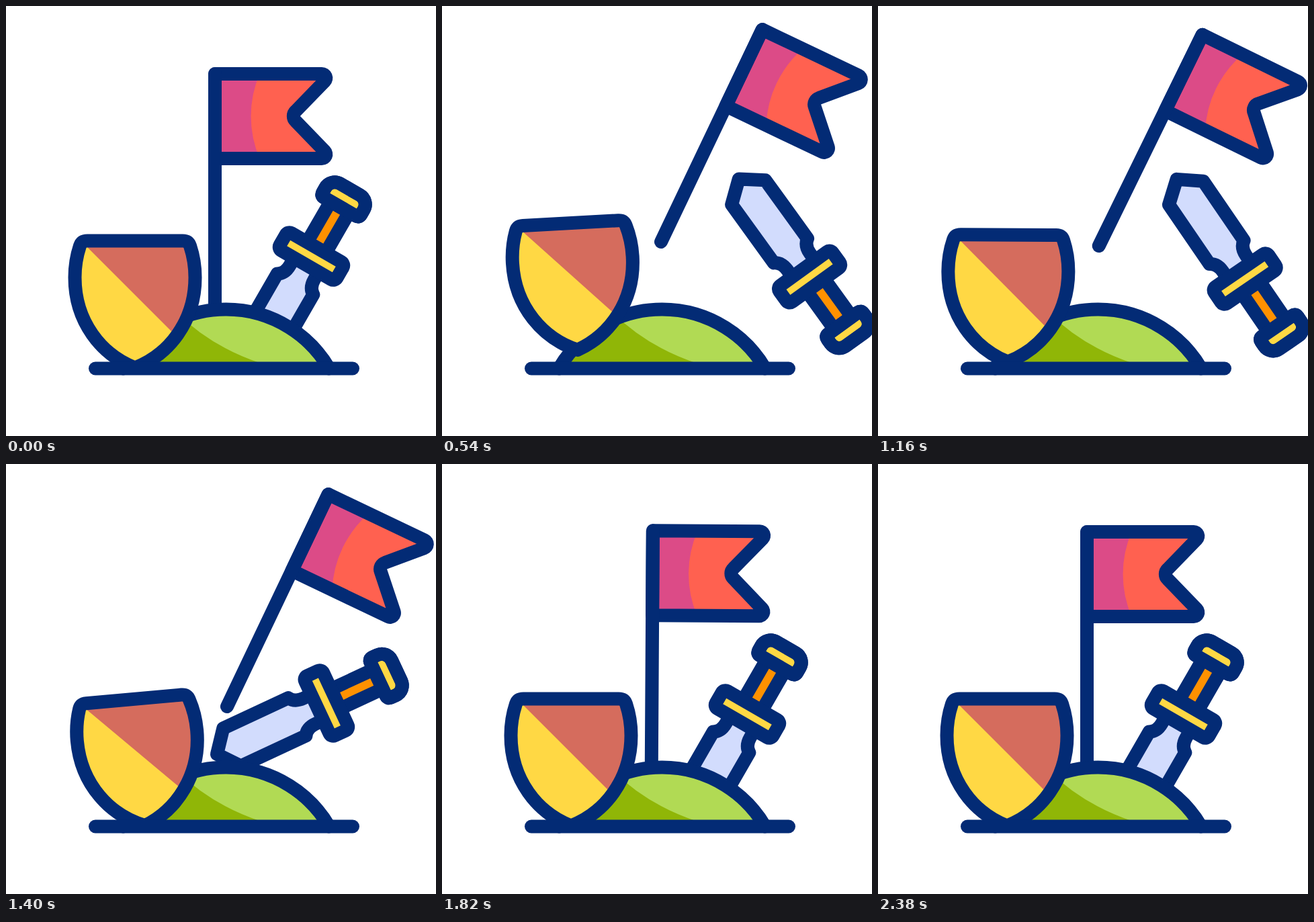
Recreate the animation shown at these times as an HTML page. Size 640x640 px, loop 2400 ms.

```html
<!DOCTYPE html>
<html lang="en">
<head>
<meta charset="utf-8">
<title>Flag, shield and sword</title>
<style>
  html, body { margin: 0; width: 100%; height: 100%; overflow: hidden; background: #fff; }
  svg { display: block; width: 100vw; height: 100vh; }
  .line { fill: none; stroke: #032b75; stroke-width: 20; stroke-linecap: round; stroke-linejoin: round; }
</style>
</head>
<body>
<svg viewBox="0 0 640 640">
  <defs>
    <path id="cloth" d="M311 101H470a6.3 6.3 0 0 1 4.5 10.7L431 156.6a10 10 0 0 0 0 14.6L474.5 216.3a6.3 6.3 0 0 1-4.5 10.7H311z"/>
    <path id="plate" d="M121 349.5H263q8.500 0 11 7.500C279 372 281.500 388 281.500 404C281.500 470 242 519 192 538.500C142 519 102.500 470 102.500 404C102.500 388 105 372 110 357Q112.500 349.500 121 349.500z"/>
    <path id="mound" d="M174 539.500A178 178 0 0 1 481 539.500z"/>
    <path id="blade" d="M-21 12V28Q-21 42-31 48V155L0 179.700 31 155V48Q21 42 21 28V12z"/>
    <clipPath id="inCloth"><use href="#cloth"/></clipPath>
    <clipPath id="inPlate"><use href="#plate"/></clipPath>
    <clipPath id="inMound"><use href="#mound"/></clipPath>
  </defs>

  <g id="flag">
    <use href="#cloth" fill="#ff6150"/>
    <path clip-path="url(#inCloth)" fill="#dc4b87" d="M311 101H377.500A160 160 0 0 0 377.500 227H311z"/>
    <use href="#cloth" class="line"/>
    <path class="line" d="M311 101V451"/>
  </g>

  <g id="sword">
    <use href="#blade" fill="#d2dcfd"/>
    <use href="#blade" class="line"/>
    <path fill="#ff9100" d="M-16-85H16V-15H-16z"/>
    <path class="line" d="M-16-85H16V-15H-16z"/>
    <g fill="#ffd844">
      <path id="pommel" d="M-33-91V-99a16 16 0 0 1 16-16H17a16 16 0 0 1 16 16V-91q0 6-6 6H-27q-6 0-6-6z"/>
      <rect x="-49" y="-15" width="98" height="30" rx="6"/>
    </g>
    <use href="#pommel" class="line" style="fill:none"/>
    <path class="line" d="M-33-91V-99a16 16 0 0 1 16-16H17a16 16 0 0 1 16 16V-91q0 6-6 6H-27q-6 0-6-6z"/>
    <rect class="line" x="-49" y="-15" width="98" height="30" rx="6"/>
  </g>

  <use href="#mound" fill="#b1da54"/>
  <path clip-path="url(#inMound)" fill="#90b607" d="M255 457Q305 507 380 532V540H170V457z"/>
  <path class="line" d="M174 539.500A178 178 0 0 1 481 539.500"/>

  <g id="shield">
    <use href="#plate" fill="#ffd844"/>
    <path clip-path="url(#inPlate)" fill="#d56c5d" d="M102 340L300 538V340z"/>
    <use href="#plate" class="line"/>
  </g>

  <path class="line" d="M133 539.500H516"/>
</svg>
<script>
const LOOP = 2400;

// Each key: time in ms, x and y of the pivot, angle in degrees.
const parts = [
  { id: "flag", pivot: [311, 451], keys: [
    [0, 311, 451, 0], [540, 326, 351, 25.5], [860, 328, 353, 26.4], [1400, 329, 361, 25.5],
    [1620, 326, 365, 20.5], [1820, 311.8, 449.2, 0.35], [1900, 311, 451, 0], [LOOP, 311, 451, 0]] },
  { id: "sword", pivot: [0, 0], keys: [
    [0, 454.5, 372.5, 30], [320, 468.5, 353, 56], [540, 547, 403, 144], [860, 563.5, 420, 165.6],
    [1080, 559, 417, 160], [1400, 477, 356, 65.2], [1660, 454.5, 372.5, 30], [LOOP, 454.5, 372.5, 30]] },
  { id: "shield", pivot: [192, 443.5], keys: [
    [0, 192, 443.5, 0], [320, 198.7, 402.5, -5.8], [540, 196.5, 417, -3.2], [860, 186.8, 420, 7.9],
    [1400, 198.5, 443.5, -5.1], [1660, 192, 443.5, 0], [LOOP, 192, 443.5, 0]] }
];

// Monotone cubic through the keys, so that no part overshoots.
function valueAt(keys, channel, t) {
  const slope = i => keys[i] && keys[i + 1]
    ? (keys[i + 1][channel] - keys[i][channel]) / (keys[i + 1][0] - keys[i][0]) : 0;
  const tangent = i => {
    const a = slope(i - 1), b = slope(i);
    return a * b > 0 ? 2 * a * b / (a + b) : 0;
  };
  const i = keys.findIndex(k => k[0] > t) - 1;
  const span = keys[i + 1][0] - keys[i][0];
  const u = (t - keys[i][0]) / span, v = 1 - u;
  return keys[i][channel] * v * v * (1 + 2 * u) + keys[i + 1][channel] * u * u * (3 - 2 * u)
    + span * u * v * (tangent(i) * v - tangent(i + 1) * u);
}

function draw(now) {
  const t = now % LOOP;
  for (const { id, pivot, keys } of parts) {
    const [x, y, angle] = [1, 2, 3].map(channel => valueAt(keys, channel, t));
    document.getElementById(id).setAttribute("transform",
      `translate(${x} ${y}) rotate(${angle}) translate(${-pivot[0]} ${-pivot[1]})`);
  }
  requestAnimationFrame(draw);
}
draw(0);
</script>
</body>
</html>
```
